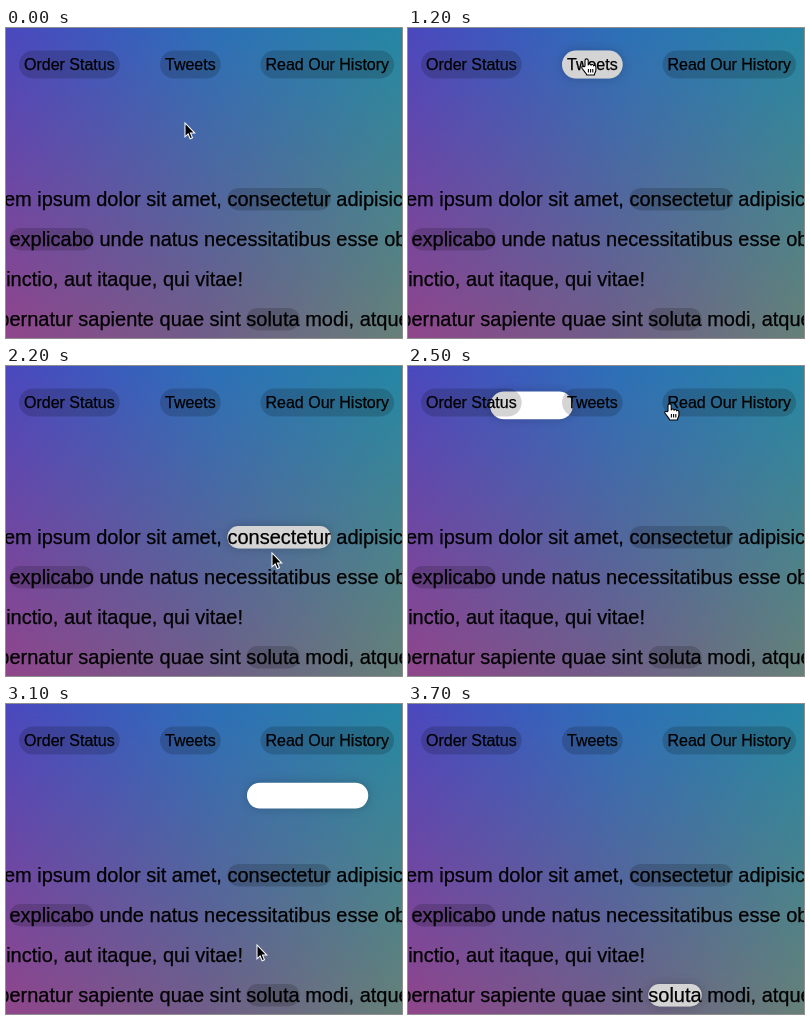
Recreate the animation shown at these times as an HTML page. Size 396 px wide and 310 px high, loop 3.8 s.

```html
<!DOCTYPE html>
<html lang="en">
<head>
<meta charset="utf-8">
<title>Follow-along links</title>
<style>
  html, body { margin: 0; width: 100%; height: 100%; overflow: hidden; }
  body {
    position: relative;
    background: linear-gradient(90deg, #4b48be, #3a5cbd 27%, #2d70b8 52%, #2587a5);
  }
  body::before {
    content: "";
    position: absolute;
    inset: 0;
    background: linear-gradient(90deg, #90468a, #715d88 50%, #668078);
    -webkit-mask: linear-gradient(transparent, #000);
    mask: linear-gradient(transparent, #000);
  }
  svg { position: absolute; left: 0; top: 0; display: block; }
  text {
    font: 20px "Liberation Sans", Arial, sans-serif;
    white-space: pre;
    stroke: #000;
    stroke-width: .25px;
  }
  .nav { font-size: 16px; }
  .end { text-anchor: end; }
  .pill { fill: rgba(0, 0, 0, .17); }
  #glow { fill: #fff; filter: drop-shadow(0 0 5px rgba(0, 0, 0, .2)); }
  #arrow { fill: #000; stroke: #fff; stroke-width: 1.2; transform: scale(.85); }
  #hand { fill: #fff; stroke: #000; stroke-width: 1.1; stroke-linejoin: round; }
</style>
</head>
<body>
<svg width="396" height="310" viewBox="0 0 396 310">
  <rect id="glow"/>
  <g id="pills"></g>

  <text class="nav link" x="18" y="42">Order Status</text>
  <text class="nav link" x="159" y="42">Tweets</text>
  <text class="nav link" x="259.5" y="42">Read Our History</text>

  <text class="end" x="215.8" y="178">Lorem ipsum dolor sit amet,</text>
  <text class="link" x="221.4" y="178">consectetur</text>
  <text x="330.3" y="178">adipisicing elit.</text>
  <text class="link" x="3.4" y="218">explicabo</text>
  <text x="93.5" y="218">unde natus necessitatibus esse obcaecati</text>
  <text class="end" x="237" y="258">distinctio, aut itaque, qui vitae!</text>
  <text class="end" x="234.7" y="298">aspernatur sapiente quae sint</text>
  <text class="link" x="240.3" y="298">soluta</text>
  <text x="299.2" y="298">modi, atque libero</text>

  <g id="pointer">
    <path id="arrow" d="M0 0V16.3L3.7 12.9 6.1 18.5 8.8 17.4 6.4 11.8H11.5Z"/>
    <g id="hand">
      <path d="M-2 7V1.5a1.6 1.6 0 0 1 3.2 0V6c0-1.3 2.8-1.3 2.8.3c.2-1.2 2.6-1.1 2.7.6c.4-.9 2.2-.6 2.2.9V11c0 2-1.5 3-1.5 5H-.2c-.5-2-3-4-4.8-6.8c-.9-1.6.8-2.6 2-1.4Z"/>
      <path fill="none" d="M1.4 10v3.4M3.6 10v3.4M5.8 10v3.4"/>
    </g>
  </g>
</svg>
<script>
  const LOOP = 3800, TICK = 100, SLIDE = 200, SCAN = 2;
  const $ = id => document.getElementById(id);
  const mix = (a, b, k) => a.map((v, i) => v + (b[i] - v) * k);

  // Turning points of the pointer: time, x, y
  const path = [
    [0, 179, 95], [600, 178, 96], [1000, 179, 33], [1200, 179, 31],
    [1400, 290, 36], [1480, 300, 38], [1700, 75, 38], [1850, 72, 38],
    [2000, 268, 176], [2200, 266, 187], [2300, 75, 40], [2400, 72, 38],
    [2520, 300, 38], [2700, 323, 39], [2974, 322, 42], [3100, 251, 241],
    [3150, 260, 290], [LOOP, 275, 345]
  ];

  // The pill around a link follows from its text.
  function boxOf(text) {
    const size = parseFloat(getComputedStyle(text).fontSize);
    const pad = text.matches('.nav') ? 5 : 0;
    return [
      +text.getAttribute('x') - pad,
      +text.getAttribute('y') - .9 * size - pad,
      text.getComputedTextLength() + 2 * pad,
      1.12 * size + 2 * pad
    ];
  }

  function setBox(el, [x, y, w, h]) {
    const box = { x, y, width: w, height: h, rx: h / 2 };
    for (const key in box) el.setAttribute(key, box[key]);
  }

  function pointerAt(t) {
    const i = path.findIndex(p => p[0] > t);
    const a = path[i - 1], b = path[i];
    return mix(a, b, (t - a[0]) / (b[0] - a[0])).slice(1);
  }

  const links = [...document.querySelectorAll('.link')].map(boxOf);

  function linkAt(t) {
    const [px, py] = pointerAt(t);
    return links.find(([x, y, w, h]) =>
      px >= x && px <= x + w && py >= y && py <= y + h);
  }

  // Every link the pointer enters becomes the next stop of the highlight.
  const visits = [];
  for (let t = 0; t < LOOP; t += SCAN) {
    const box = linkAt(t), last = visits[visits.length - 1];
    if (box && (!last || last.box !== box)) visits.push({ t, box });
  }

  // cubic-bezier(.25, .1, .25, 1)
  function ease(x) {
    const curve = (a, b, u) => 3 * a * u * (1 - u) ** 2 + 3 * b * u * u * (1 - u) + u ** 3;
    let lo = 0, hi = 1;
    for (let i = 0; i < 20; i++) {
      const mid = (lo + hi) / 2;
      if (curve(.25, .25, mid) < x) lo = mid; else hi = mid;
    }
    return curve(.1, 1, lo);
  }

  // Each slide starts from wherever the highlight is at that moment.
  function glowAt(t) {
    let from = [-130, -40, 0, 0], to = from, start = 0;
    const at = now => mix(from, to, ease(Math.min(1, (now - start) / SLIDE)));
    for (const visit of visits) {
      if (visit.t > t) break;
      from = at(visit.t);
      to = visit.box;
      start = visit.t;
    }
    return at(t);
  }

  for (const box of links) {
    const pill = document.createElementNS($('glow').namespaceURI, 'rect');
    pill.setAttribute('class', 'pill');
    setBox(pill, box);
    $('pills').append(pill);
  }

  function draw(t) {
    const over = linkAt(t);
    setBox($('glow'), glowAt(t));
    $('pointer').setAttribute('transform', `translate(${pointerAt(t)})`);
    $('arrow').style.display = over ? 'none' : '';
    $('hand').style.display = over ? '' : 'none';
  }

  // The picture advances ten times a second.
  const begin = performance.now();
  function loop() {
    const t = (performance.now() - begin) % LOOP;
    draw(Math.floor(t / TICK) * TICK);
    requestAnimationFrame(loop);
  }
  loop();
</script>
</body>
</html>
```
